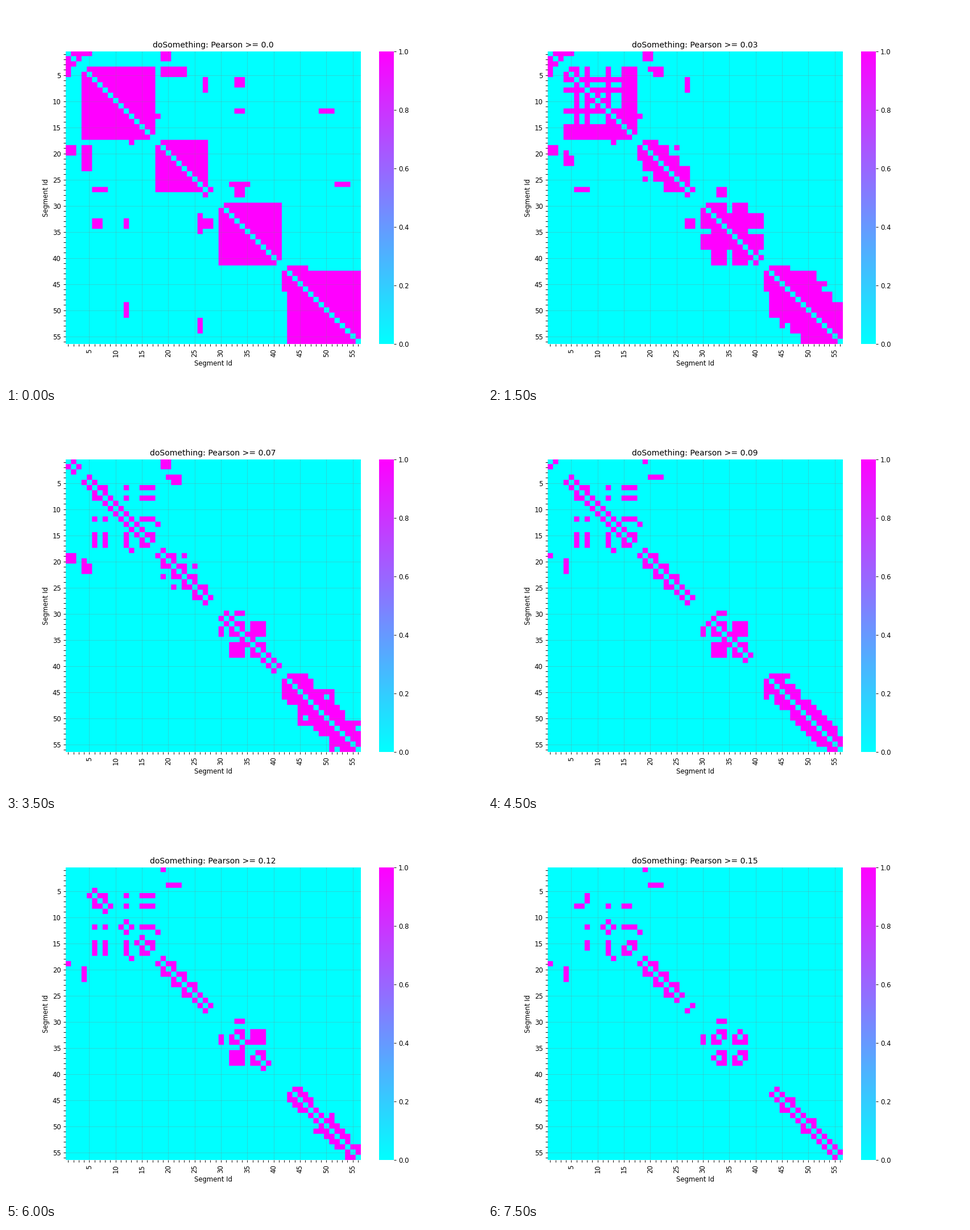
Animation of 837x669 px, one loop 8 s. Source, as a matplotlib script:

```python
import numpy as np
import matplotlib.pyplot as plt
from matplotlib.animation import FuncAnimation
from matplotlib.ticker import FixedLocator

N = 56
STEPS = 16
DPI = 83.7
LIFT = 4

# Communities: first, last, base strength, reach, bonus of neighbours, hubs
GROUPS = [
    (1, 3, 2, 3, 6, [1]),
    (4, 17, 2.5, 40, 9, [6, 8, 12, 15, 16, 17]),
    (18, 27, 8, 3, 6, [19, 21, 23, 25]),
    (30, 41, 1, 40, 8, [32, 33, 34, 36, 37, 38]),
    (43, 56, 16, 4, 2, [45, 51]),
]

# Bridges between communities: first row, last row, first column, last column, level
BRIDGES = [
    (1, 1, 4, 5, 5), (1, 2, 19, 20, 7), (1, 1, 19, 19, 16),
    (4, 5, 19, 23, 1), (4, 4, 20, 22, 16), (5, 5, 21, 22, 7),
    (6, 8, 27, 27, 3), (6, 7, 33, 34, 0), (12, 12, 33, 34, 0),
    (12, 12, 49, 51, 0), (13, 13, 18, 18, 16), (18, 20, 26, 26, 0),
    (26, 26, 32, 35, 0), (26, 26, 52, 54, 0), (27, 27, 28, 28, 16),
    (27, 28, 33, 34, 4), (30, 30, 33, 34, 16), (42, 42, 43, 46, 9),
]


def build_levels():
    """Threshold step up to which each pair of segments stays linked."""
    rng = np.random.default_rng(7)
    ids = np.arange(N + 1)
    dist = np.abs(ids[:, None] - ids)
    noise = rng.uniform(0.92, 1.08, dist.shape)
    level = np.full(dist.shape, -1.0)

    for first, last, base, reach, near, hubs in GROUPS:
        hub = np.isin(ids, hubs).astype(int)
        count = hub[:, None] + hub
        force = (base + LIFT * count**2) * np.exp((1 - dist) / reach)
        force += near * (dist == 1)
        part = slice(first, last + 1)
        level[part, part] = (force * noise - 0.5)[part, part]
    for r0, r1, c0, c1, value in BRIDGES:
        block = level[r0:r1 + 1, c0:c1 + 1]
        np.maximum(block, value, out=block)

    upper = np.where(ids[:, None] < ids, level, -1)
    return np.maximum(upper, upper.T)[1:, 1:]


levels = build_levels()


def cells(step):
    # Enlarged so that smoothing only softens the cell borders
    return np.kron(levels >= step, np.ones((10, 10)))


fig, ax = plt.subplots(figsize=((837 + 1e-6) / DPI, (669 + 1e-6) / DPI),
                       dpi=DPI)
image = ax.imshow(cells(0), cmap="cool", vmin=0, vmax=1, aspect="auto",
                  interpolation="bilinear",
                  extent=(0.5, N + 0.5, N + 0.5, 0.5))
for axis in (ax.xaxis, ax.yaxis):
    axis.set_major_locator(FixedLocator(range(5, N, 5)))
    axis.set_minor_locator(FixedLocator(range(1, N + 1)))
ax.tick_params(which="both", length=3.5, width=0.8)
ax.tick_params(axis="x", labelrotation=90)
ax.set_axisbelow(False)
ax.grid(True, which="major", color="gray", lw=0.5, alpha=0.5)
ax.spines[:].set_visible(False)
ax.set_xlabel("Segment Id")
ax.set_ylabel("Segment Id")
title = ax.set_title("")

bar = fig.colorbar(image, ax=ax)
bar.outline.set_visible(False)


def draw(step):
    image.set_data(cells(step))
    title.set_text(f"doSomething: Pearson >= {round(step / 100, 2)}")
    return image, title


anim = FuncAnimation(fig, draw, frames=STEPS, interval=500, repeat=True,
                     repeat_delay=0)
plt.show()
```
